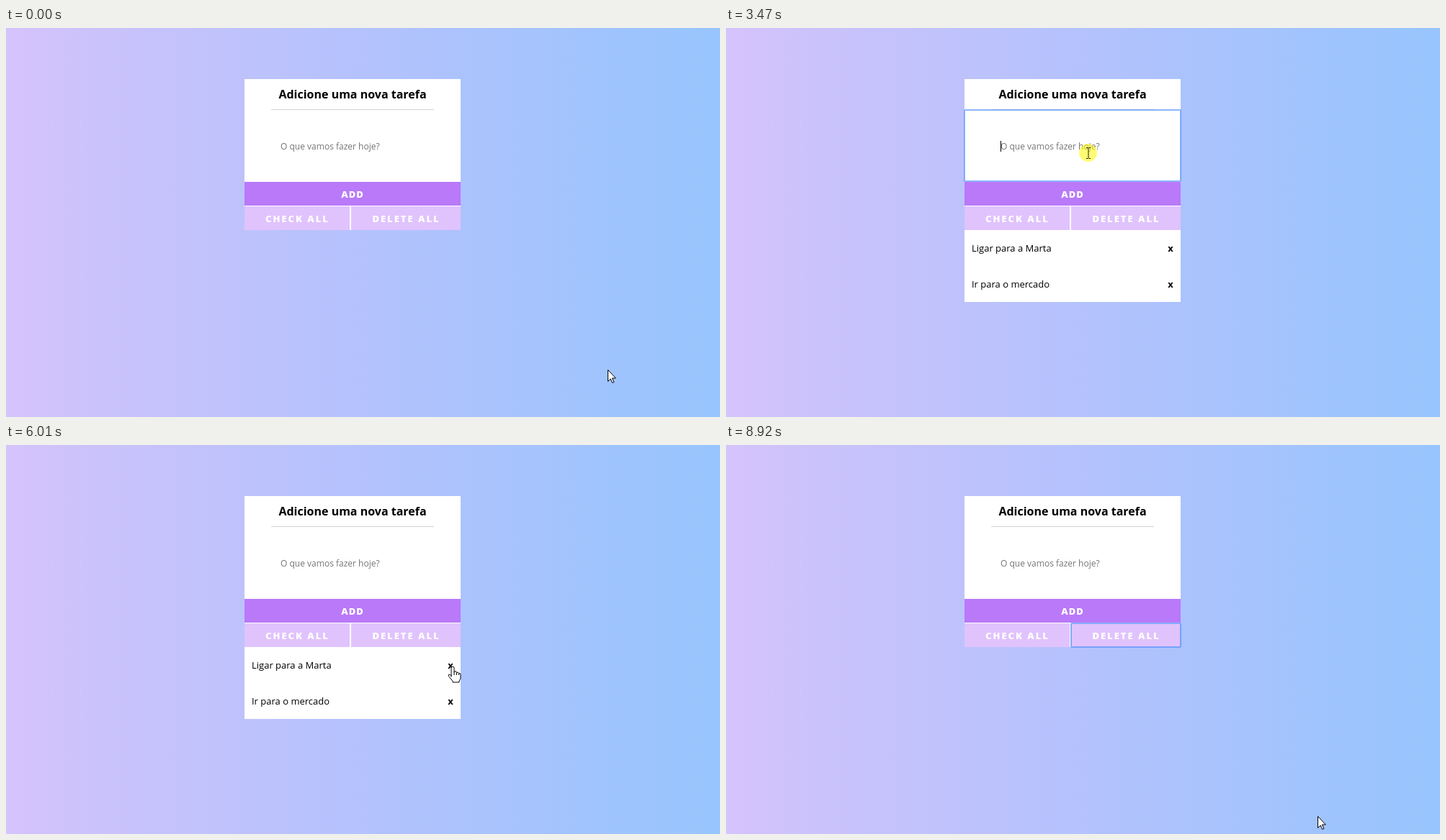
Recreate the animation shown at these times as an HTML page. Size 991x541 px, loop 8960 ms.

```html
<!DOCTYPE html>
<html lang="pt-BR">
<head>
<meta charset="utf-8">
<title>Lista de tarefas</title>
<style>
  html, body {
    margin: 0; width: 100%; height: 100%; overflow: hidden;
    background: linear-gradient(90deg, #d5c3fc, #c6c2fb 20%, #b1c2fd 55%, #9cc4fd 90%, #98c5fd);
  }
  svg { display: block; width: 991px; height: 541px; }
  text { font: 13px "Open Sans", sans-serif; white-space: pre; }
  .title { font-size: 16px; font-weight: 700; text-anchor: middle; }
  .button { font-weight: 800; fill: #fff; letter-spacing: 2px; text-anchor: middle; }
  .add { letter-spacing: 1px; }
  .hint { font-size: 12px; fill: #757575; }
  .typed { font: 13.333px "Liberation Sans", Arial, sans-serif; }
  .cross { font-weight: 700; text-anchor: middle; }
  .done { fill: #999; text-decoration: line-through; }
  #ring { fill: none; stroke: #4d90fe; stroke-width: 2; stroke-opacity: .65; }
  .pointer { fill: #fff; stroke: #000; stroke-linejoin: round; }
</style>
</head>
<body>
<svg viewBox="0 0 991 541">
  <path fill="#fff" d="M331 71h300v210h-300z"/>
  <text class="title" x="481" y="98">Adicione uma nova tarefa</text>
  <path fill="#d3d3d3" d="M368 113h226v1h-226z"/>
  <text id="hint" class="hint" x="381" y="169">O que vamos fazer hoje?</text>
  <text id="typed" class="typed" x="381" y="169"></text>
  <path id="caret" d="M0 157h1v15h-1z"/>
  <path fill="#b979f8" d="M331 214h300v33h-300z"/>
  <path fill="#e0c3fc" d="M331 248h146v33h-146zM479 248h152v33h-152z"/>
  <text class="button add" x="481" y="236">ADD</text>
  <text class="button" x="404.5" y="270">CHECK ALL</text>
  <text class="button" x="555.5" y="270">DELETE ALL</text>
  <g id="list"></g>
  <rect id="ring" rx="1"/>
  <circle id="press" r="12.4" fill="#fffa00" fill-opacity=".55"/>
  <g id="cursor">
    <path id="arrow" class="pointer" d="M.5 .5V16.5L4.2 13L6.7 18.5L8.9 17.5L6.4 12H11.3Z"/>
    <path id="beam" fill="none" stroke="#222" d="M-3 -7.5H-.5M.5 -7.5H3M0 -7V7M-3 7.5H-.5M.5 7.5H3"/>
    <g id="hand" class="pointer">
      <path d="M-2 14V2Q-2 0 0 0Q2 0 2 2V8Q2 6.5 4 6.8Q5.4 7 5.5 8.5Q8 7.3 8.5 9.5Q11 9 11 11.5V15Q11 18 9 20V22H0V20.5L-5.5 13.5Q-6.5 11.5 -5 11Q-4 10.8 -2 13Z"/>
      <path d="M2 8V12M5.5 8.5V12M8.5 9.5V12"/>
    </g>
  </g>
</svg>
<script>
const LOOP = 8960, HOLD = 70, LIST_TOP = 281, ROW = 50;
const $ = id => document.getElementById(id);
const show = (node, on) => node.setAttribute('visibility', on ? 'visible' : 'hidden');
const setAttrs = (node, attrs) => Object.entries(attrs).forEach(([k, v]) => node.setAttribute(k, v));

const controls = {
  input: { x: 331, y: 114, width: 300, height: 99 },
  add: { x: 331, y: 214, width: 300, height: 32 },
  checkAll: { x: 331, y: 248, width: 146, height: 33 },
  deleteAll: { x: 479, y: 248, width: 152, height: 33 }
};

const go = (leave, arrive, x, y) => ({ leave, arrive, x, y });
const click = (...move) => ({ ...go(...move), click: true });
const home = { x: 835, y: 475 };
const moves = [
  click(30, 150, 503, 174),
  click(1370, 1470, 452, 230),
  click(1540, 1760, 503, 174),
  click(3070, 3190, 484, 230),
  click(3260, 3440, 503, 174),
  click(4600, 4740, 498, 233),
  click(4810, 5150, 400, 312),
  click(5220, 5830, 620, 308),
  click(6110, 6360, 407, 269),
  go(6670, 6890, 495, 271),
  click(7030, 7310, 424, 356),
  click(7380, 7600, 424, 317),
  click(7740, 8530, 525, 262),
  go(8740, 8920, 821, 516)
];

const typing = [
  { text: 'Ir para o mercado', from: 360, to: 1210 },
  { text: 'Ligar para a Marta', from: 1960, to: 3040 },
  { text: 'Estudar JS', from: 3630, to: 4380 }
];

const rows = typing.map((_, i) => {
  const row = document.createElementNS('http://www.w3.org/2000/svg', 'g');
  row.setAttribute('transform', `translate(0 ${LIST_TOP + i * ROW})`);
  row.innerHTML = `<path fill="#fff" d="M331 0h300v${ROW}h-300z"/>
    <text x="341" y="30"></text><text class="cross" x="617" y="30">x</text>`;
  $('list').append(row);
  return row;
});

function pointerAt(t) {
  const i = moves.findLastIndex(m => m.leave <= t);
  if (i < 0) return home;
  const from = moves[i - 1] || home, to = moves[i];
  const k = Math.min(1, (t - to.leave) / (to.arrive - to.leave));
  const ease = k * k * (3 - 2 * k);
  const mix = axis => Math.round(from[axis] + (to[axis] - from[axis]) * ease);
  return { x: mix('x'), y: mix('y') };
}

function controlAt({ x, y }) {
  return Object.keys(controls).find(name => {
    const c = controls[name];
    return x >= c.x && x < c.x + c.width && y >= c.y && y <= c.y + c.height;
  });
}

const rowAt = y => Math.floor((y - LIST_TOP) / ROW);
const overCross = ({ x, y }) => Math.abs(x - 617) < 7 && Math.abs((y - LIST_TOP) % ROW - 25) < 10;

// Replays every click up to time t
function stateAt(t) {
  const state = { tasks: [], added: 0, focus: undefined, pressed: false };
  for (const move of moves.filter(m => m.click && m.arrive <= t)) {
    state.focus = controlAt(move);
    state.pressed = t < move.arrive + HOLD;
    if (state.pressed) break;
    const row = rowAt(move.y);
    if (state.focus === 'add') state.tasks.unshift({ text: typing[state.added++].text });
    else if (state.focus === 'checkAll') state.tasks.forEach(task => { task.done = true; });
    else if (state.focus === 'deleteAll') state.tasks = [];
    else if (overCross(move)) state.tasks.splice(row, 1);
    else if (state.tasks[row]) state.tasks[row].done = !state.tasks[row].done;
  }
  return state;
}

function typedAt(t, entry) {
  if (!entry || t < entry.from) return '';
  const gap = (entry.to - entry.from) / (entry.text.length - 1);
  return entry.text.slice(0, 1 + Math.floor((t - entry.from) / gap));
}

function draw(t) {
  const { tasks, added, focus, pressed } = stateAt(t);
  const pointer = pointerAt(t);

  rows.forEach((row, i) => {
    const task = tasks[i], label = row.querySelector('text');
    show(row, task);
    label.textContent = task ? task.text : '';
    label.classList.toggle('done', Boolean(task && task.done));
  });

  const typed = typedAt(t, typing[added]);
  $('typed').textContent = typed;
  show($('hint'), !typed);
  show($('caret'), focus === 'input');
  const width = typed ? $('typed').getComputedTextLength() : 0;
  $('caret').setAttribute('transform', `translate(${Math.round(381 + width)} 0)`);

  show($('ring'), focus);
  if (focus) setAttrs($('ring'), controls[focus]);
  show($('press'), pressed);
  setAttrs($('press'), { cx: pointer.x - .5, cy: pointer.y - .5 });

  const overInput = controlAt(pointer) === 'input';
  const overRemove = Boolean(tasks[rowAt(pointer.y)]) && overCross(pointer);
  show($('beam'), overInput);
  show($('hand'), overRemove);
  show($('arrow'), !overInput && !overRemove);
  $('cursor').setAttribute('transform', `translate(${pointer.x} ${pointer.y})`);
}

const start = performance.now();
function tick() {
  draw((performance.now() - start) % LOOP);
  requestAnimationFrame(tick);
}
tick();
</script>
</body>
</html>
```
